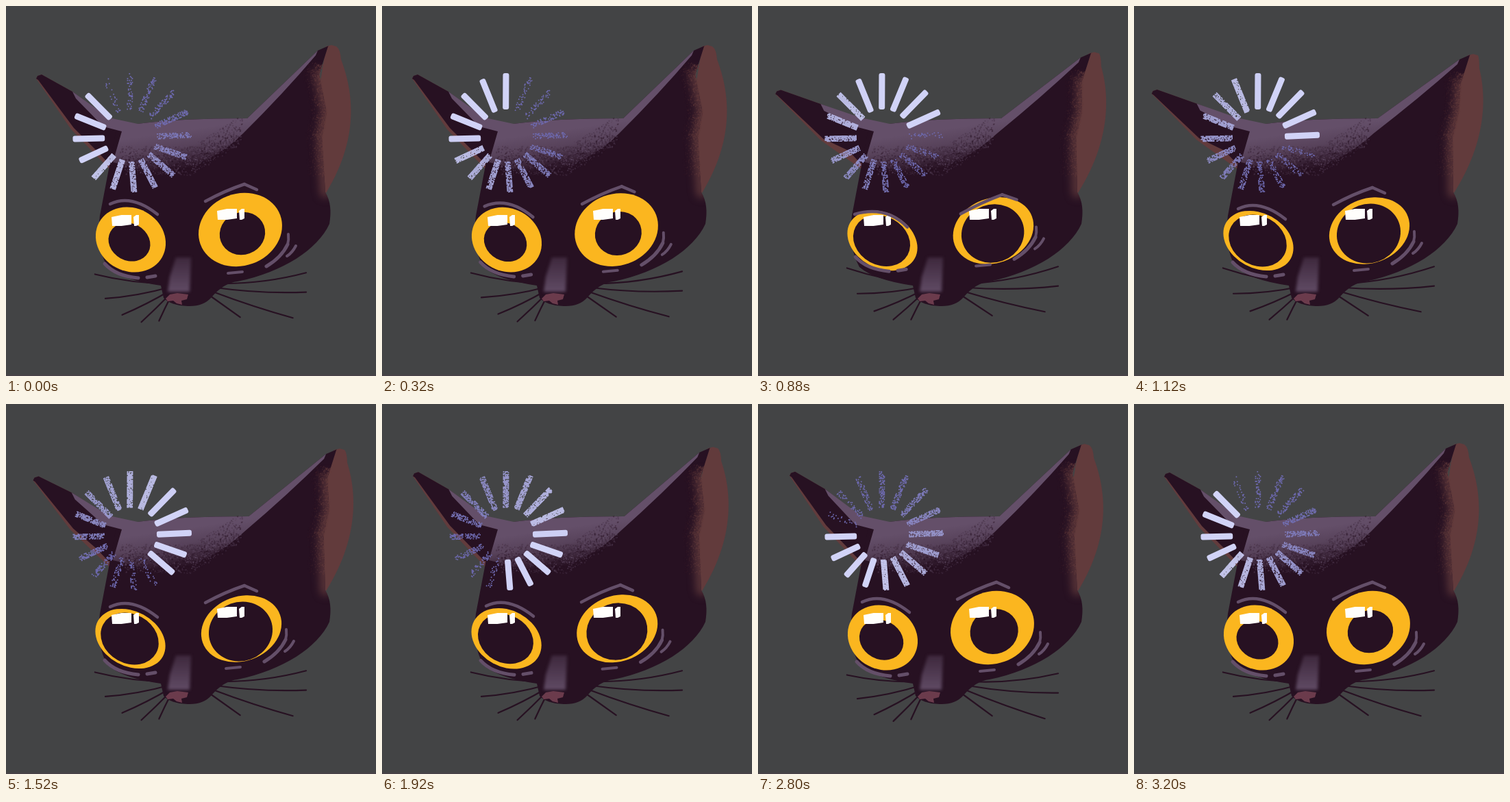
An HTML page with a canvas for the animation above (3.24 s loop, 540 px wide and 540 px high).

```html
<!DOCTYPE html>
<html lang="en">
<head>
<meta charset="utf-8">
<title>Cat loader</title>
<style>
  html, body { margin: 0; width: 100%; height: 100%; overflow: hidden; background: #434445; }
  canvas { display: block; width: 540px; height: 540px; }
</style>
</head>
<body>
<canvas id="stage" width="540" height="540"></canvas>
<script>
const ctx = document.getElementById('stage').getContext('2d');
const LOOP = 3240, STEP = 40, SPOKES = 16;
const BG = '#434445', DARK = '#271122', PURPLE = '#644f69', BROWN = '#623b3c',
      YELLOW = '#fbb61f', NOSE = '#6b3b4c', WHITE = '#fffefc';

const lerp = (a, b, t) => a + (b - a) * t;
const clamp = v => Math.max(0, Math.min(1, v));
const mixAll = (a, b, t) => a.map((v, i) => lerp(v, b[i], t));
const rand = n => { const s = Math.sin(n * 127.1 + 11.7) * 43758.5453; return s - Math.floor(s); };
const polar = (x, y, r, deg) => [x + r * Math.cos(deg * Math.PI / 180), y + r * Math.sin(deg * Math.PI / 180)];

function ease(t, from, to) {
  const u = clamp((t - from) / (to - from));
  return u * u * (3 - 2 * u);
}
// rises from a to b, holds, falls from c to d
const pulse = (t, a, b, c, d) => ease(t, a, b) - ease(t, c, d);

function poseAt(t) {
  const fold = pulse(t, 450, 960, 980, 1760), perk = pulse(t, 1800, 2200, 2300, 3200);
  const lean = pulse(t, 300, 1120, 1160, 2000), flick = pulse(t, 1800, 2200, 2260, 2880);
  return {
    lx: 44 - 20 * fold + 5 * perk,
    ly: 106 + 24 * fold - 3 * perk,
    tx: 471 + 20 * lean + 36 * flick,
    ty: 58 + 13 * lean + 25 * flick,
    squint: pulse(t, 250, 560, 760, 1040),
    narrow: pulse(t, 200, 1000, 1600, 2800),
    pupil: pulse(t, 200, 1000, 1500, 3200),
    lift: 4 * pulse(t, 2200, 2700, 2800, 3200) - 9 * pulse(t, 200, 600, 1120, 1480)
  };
}

function poly(points, color) {
  ctx.beginPath();
  points.forEach(p => ctx.lineTo(p[0], p[1]));
  ctx.closePath();
  ctx.fillStyle = color;
  ctx.fill();
}

// 4 numbers draw a line, 6 a quadratic curve
function stroke(p, width, color) {
  ctx.beginPath();
  ctx.moveTo(p[0], p[1]);
  if (p.length === 4) ctx.lineTo(p[2], p[3]);
  else ctx.quadraticCurveTo(...p.slice(2));
  ctx.lineWidth = width;
  ctx.strokeStyle = color;
  ctx.stroke();
}

function grain(x, y, size, alpha, color) {
  ctx.globalAlpha = alpha;
  ctx.fillStyle = color;
  ctx.fillRect(x, y, size, size);
  ctx.globalAlpha = 1;
}

function whisker(x0, y0, [x1, y1], sag, lift) {
  stroke([x0, y0, (x0 + x1) / 2, (y0 + y1) / 2 + sag + lift * .5, x1, y1 + lift], 2.2, DARK);
}

function whiskers({ lift }) {
  for (let i = 0; i < 4; i++) {
    const end = polar(310, 405, 129 - .29 * i ** 5, -7 + 11.5 * i + 1.1 * i ** 3);
    whisker(310 - 4 * i, 405 + 6 * i, end, 9 - 3 * i, lift * (i < 3 ? 1 : .25));
  }
  for (let i = 0; i < 5; i++) {
    const end = polar(240, 405, 111 - 13.5 * i, 187 - 20 * i);
    whisker(240, 405 + 5 * i, end, 7 - 2 * i, lift * (1 - i * .2));
  }
}

function head({ lx, ly, tx, ty }) {
  const dl = lx - 44, dy = ly - 106, dx = tx - 471;
  const up = [97 + .3 * dl, 125 + .8 * dy], low = [95 + .2 * dl, 180 + .7 * dy];
  const tip = [[lx, ly], [lx + 2, ly - 4], [lx + 8, ly - 6]];
  const base = 352 + .18 * dx;
  const inner = [[tx - 1, ty + 1], [tx - 14, ty + 42], [468 + .3 * dx, 155], [461 + .2 * dx, 192], [466, 272]];

  // left ear with a thin lining
  const earTop = [...tip, up, [150, 165], [192, 174], [160, 230]];
  poly([...earTop, [151, 238], low], BROWN);
  poly([...earTop, [149, 229], [132, 211], [low[0] + 4, low[1] - 2], [lx + 3, ly + 2]], DARK);

  // right ear lining
  ctx.beginPath();
  ctx.moveTo(tx - 4, ty + 1);
  ctx.lineTo(tx + 4, ty - 1);
  ctx.lineTo(tx + 11, ty + 1);
  ctx.quadraticCurveTo(tx + 17 - .2 * dx, ty + 5, tx + 18 - .25 * dx, ty + 20);
  ctx.bezierCurveTo(503 + .35 * dx, 115, 521 + .1 * dx, 185, 467, 273);
  ctx.lineTo(440, 230);
  ctx.closePath();
  ctx.fillStyle = BROWN;
  ctx.fill();

  const skull = new Path2D();
  skull.moveTo(192, 172);
  skull.quadraticCurveTo(250, 164, base, 164);
  skull.lineTo(tx - 16, ty + 7);
  skull.lineTo(tx, ty);
  inner.forEach(p => skull.lineTo(...p));
  skull.bezierCurveTo(474, 285, 475, 300, 472, 318);
  skull.bezierCurveTo(455, 355, 405, 388, 338, 402);
  skull.quadraticCurveTo(318, 404, 300, 425);
  skull.quadraticCurveTo(288, 439, 265, 438);
  skull.quadraticCurveTo(240, 437, 230, 426);
  skull.lineTo(226, 408);
  skull.quadraticCurveTo(170, 400, 148, 381);
  skull.quadraticCurveTo(131, 350, 137, 306);
  skull.lineTo(150, 238);
  skull.lineTo(160, 184);
  skull.closePath();
  ctx.fillStyle = DARK;
  ctx.fill(skull);

  // soft, brushed edge of the lining
  ctx.save();
  ctx.clip(skull);
  ctx.filter = 'blur(6px)';
  ctx.globalAlpha = .8;
  ctx.beginPath();
  inner.slice(1).forEach(p => ctx.lineTo(...p));
  ctx.lineWidth = 16;
  ctx.strokeStyle = BROWN;
  ctx.stroke();
  ctx.restore();
  for (let i = 0; i < 700; i++) {
    const v = .6 + rand(i) * 3.1, k = Math.floor(v);
    const [x, y] = mixAll(inner[k], inner[k + 1], v - k);
    const d = rand(i + 3000) ** 1.6;
    grain(x - d * 26, y + rand(i + 6000) * 4 - 2, 1.6, .6 * (1 - d), BROWN);
  }

  // lit crown
  ctx.beginPath();
  ctx.moveTo(...up);
  ctx.lineTo(150, 163);
  ctx.lineTo(192, 172);
  ctx.quadraticCurveTo(250, 164, base, 164);
  ctx.lineTo(tx - 16, ty + 7);
  ctx.lineTo(tx - 19, ty + 14);
  ctx.quadraticCurveTo((base + tx) / 2 - 6, (172 + ty) / 2 + 12, base - 6, 186);
  ctx.quadraticCurveTo(300, 232, 230, 246);
  ctx.lineTo(156, 228);
  ctx.lineTo(169, 183);
  ctx.lineTo(142, 176);
  ctx.lineTo(up[0] + 5, up[1] + 10);
  ctx.closePath();
  const fade = ctx.createLinearGradient(235, 185, 243, 240);
  fade.addColorStop(0, PURPLE);
  fade.addColorStop(.4, 'rgba(100,79,105,.8)');
  fade.addColorStop(1, 'rgba(100,79,105,0)');
  ctx.fillStyle = fade;
  ctx.fill();
  for (let i = 0; i < 1500; i++) {
    const x = 166 + rand(i) * 178, d = rand(i + 2000);
    const floor = 246 - Math.max(0, x - 270) * .62;
    grain(x, floor - d * 42, 1 + rand(i + 4000) * 1.3, .45 * (1 - Math.abs(d - .4)), i % 2 ? DARK : PURPLE);
  }
}

function muzzle() {
  ctx.save();
  ctx.filter = 'blur(2px)';
  const g = ctx.createLinearGradient(0, 364, 0, 418);
  g.addColorStop(0, 'rgba(100,79,105,.35)');
  g.addColorStop(1, 'rgba(100,79,105,.95)');
  poly([[248, 367], [270, 367], [268, 417], [236, 417], [239, 395]], g);
  ctx.restore();
  poly([[233, 427], [239, 421], [250, 419], [266, 421], [264, 428], [256, 430], [257, 436],
        [249, 434], [244, 430], [236, 431]], NOSE);
}

function glint(x, y, w, h) {
  poly([[x, y + 3], [x + w / 2, y], [x + w, y], [x + w, y + h - 2], [x + w / 2, y + h], [x + 1, y + h]], WHITE);
}

// oval pairs go from wide awake to narrowed: x, y, radius x, radius y
const EYES = [
  { tilt: .5, lid: [167, 346, .17], glint: [154, 305],
    iris: [[182, 341, 52.5, 46], [181.5, 342.5, 54, 40]],
    pupil: [[180, 344.5, 31.5, 27], [180.5, 342.5, 44, 36]] },
  { tilt: -.35, lid: [350, 331, -.45], glint: [308, 296],
    iris: [[342, 326.5, 62, 52.5], [343.5, 328, 60, 47]],
    pupil: [[345, 332, 33.5, 31], [342.5, 332, 47, 43]] }
];

function eye(e, { squint, narrow, pupil }) {
  const [x, y, angle] = e.lid;
  const half = lerp(160, 69, squint), top = lerp(300, 56, squint), bottom = lerp(300, 43, squint);
  ctx.save();
  ctx.translate(x, y);
  ctx.rotate(angle);
  ctx.beginPath();
  ctx.moveTo(-half, 0);
  ctx.quadraticCurveTo(0, -top, half, 0);
  ctx.quadraticCurveTo(0, bottom, -half, 0);
  ctx.clip();
  ctx.rotate(-angle);
  ctx.translate(-x, -y);
  const oval = ([from, to], t, color) => {
    ctx.beginPath();
    ctx.ellipse(...mixAll(from, to, t), e.tilt, 0, Math.PI * 2);
    ctx.fillStyle = color;
    ctx.fill();
  };
  oval(e.iris, narrow, YELLOW);
  oval(e.pupil, pupil, DARK);
  const [gx, gy] = e.glint;
  glint(gx, gy, 29, 16);
  glint(gx + 32, gy, 8, 16);
  ctx.restore();
}

function marks({ squint, narrow }) {
  const n = narrow * (1 - squint);
  const brow = (a, b, dy) => mixAll(a.map((v, i) => v + (i % 2 ? dy : 0)), b, squint);
  stroke(brow([152, 289, 183, 274, 221, 304], [134, 312, 188, 300, 216, 333], n * 7), 4.5, PURPLE);
  const r = brow([291, 285, 348, 260, 366, 268], [299, 314, 362, 284, 385, 291], n * 5);
  stroke([r[0], r[1], (r[0] + r[2]) / 2, (r[1] + r[3]) / 2 - 3, r[2], r[3]], 4.5, PURPLE);
  stroke(r.slice(2), 4.5, PURPLE);

  ctx.save();
  ctx.translate(-8 * squint - 3 * n, -15 * squint - 4 * n);
  stroke([324, 390, 345, 388], 4, PURPLE);
  stroke([380, 380, 402, 367, 411, 348], 5, PURPLE);
  stroke([411, 348, 413, 341, 412, 333], 4, PURPLE);
  stroke([410, 365, 418, 360, 423, 350], 4, PURPLE);
  ctx.restore();
  ctx.save();
  ctx.translate(-3 * squint, -15 * squint - 2 * n);
  stroke([144, 376, 160, 394, 193, 397], 5, PURPLE);
  stroke([206, 396, 218, 394], 5, PURPLE);
  ctx.restore();
}

// each spoke is painted solid, then crumbles until its next turn
function spinner(t) {
  const turn = 14.85 + t / LOOP * SPOKES, cell = 1.4;
  for (let i = 0; i < SPOKES; i++) {
    const step = 360 / SPOKES * i;
    const deg = step - 92 + 4 * Math.sin(step * Math.PI / 180);
    const [x0, y0] = polar(184, 185, 87, deg), [x1, y1] = polar(182, 189, 38, deg);
    const age = (turn - i + SPOKES) % SPOKES;
    const cover = clamp(1 - (age - 4.2) * .075);
    const tone = mixAll([209, 211, 247], [110, 106, 176], clamp((age - 4) / 8)).map(Math.round);
    const len = Math.hypot(x1 - x0, y1 - y0);
    ctx.save();
    ctx.translate(x0, y0);
    ctx.rotate(Math.atan2(y1 - y0, x1 - x0));
    ctx.fillStyle = `rgb(${tone})`;
    if (cover > .97) {
      ctx.beginPath();
      ctx.roundRect(0, -4.5, len, 9, 3);
      ctx.fill();
    } else {
      let n = i * 500;
      for (let a = 0; a < len - 1; a += cell)
        for (let b = -4.4; b < 3.6; b += cell)
          if (rand(n++) < cover) ctx.fillRect(a, b, 1.7, 1.7);
    }
    ctx.restore();
  }
}

function draw(now) {
  const t = Math.floor(now % LOOP / STEP) * STEP;
  const pose = poseAt(t);
  ctx.fillStyle = BG;
  ctx.fillRect(0, 0, 540, 540);
  ctx.fillStyle = '#484248';
  ctx.fillRect(0, 538, 540, 2);
  ctx.lineCap = ctx.lineJoin = 'round';
  whiskers(pose);
  head(pose);
  muzzle();
  EYES.forEach(e => eye(e, pose));
  marks(pose);
  spinner(t);
}

const start = performance.now();
function tick() {
  draw(performance.now() - start);
  requestAnimationFrame(tick);
}
tick();
</script>
</body>
</html>
```
